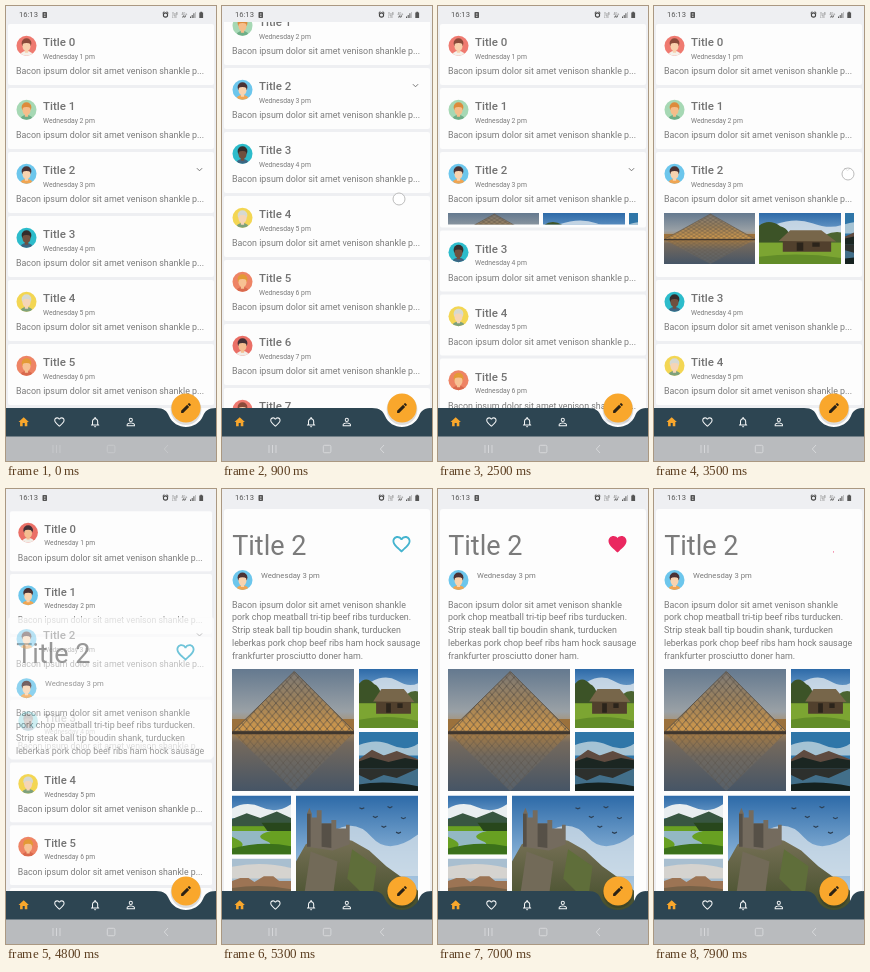
Recreate the animation shown at these times as an HTML page. Size 210 px wide and 455 px high, loop 8 s.

```html
<!DOCTYPE html>
<html lang="en">
<head>
<meta charset="utf-8">
<title>Card list</title>
<style>
html, body { margin: 0; width: 100%; height: 100%; overflow: hidden; background: #eeeff2; }
svg { display: block; }
#stage { width: 100vw; height: 100vh; }
text { font-family: Roboto, "Liberation Sans", sans-serif; fill: #7b7b7b; }
.title { font-size: 11.5px; font-weight: 500; fill: #737373; }
.date { font-size: 6.8px; }
.body { font-size: 8.9px; }
.big { font-size: 27px; }
</style>
</head>
<body>
<svg id="stage" viewBox="0 0 210 455" xmlns="http://www.w3.org/2000/svg">
  <defs>
    <linearGradient id="dusk" x2="0" y2="1">
      <stop offset="0" stop-color="#64798f"/><stop offset=".35" stop-color="#9aa1a6"/>
      <stop offset=".5" stop-color="#b08a58"/><stop offset=".6" stop-color="#75695c"/>
      <stop offset="1" stop-color="#465566"/>
    </linearGradient>
    <linearGradient id="glass" x2="0" y2="1">
      <stop offset="0" stop-color="#7d7a76"/><stop offset=".55" stop-color="#a08258"/>
      <stop offset="1" stop-color="#d39a4b"/>
    </linearGradient>
    <linearGradient id="mirror" x2="0" y2="1">
      <stop offset="0" stop-color="#a37a45"/><stop offset=".4" stop-color="#6f685f"/>
      <stop offset="1" stop-color="#56606a"/>
    </linearGradient>
    <linearGradient id="sky" x2="0" y2="1">
      <stop offset="0" stop-color="#2d6aa8"/><stop offset=".5" stop-color="#86b0d6"/>
      <stop offset="1" stop-color="#d3e0ea"/>
    </linearGradient>
    <linearGradient id="rock" x2="0" y2="1">
      <stop offset="0" stop-color="#797258"/><stop offset="1" stop-color="#3f4b27"/>
    </linearGradient>
    <pattern id="lattice" width="6" height="7" patternUnits="userSpaceOnUse">
      <path d="M0 0L6 7M6 0L0 7" stroke="#544c43" stroke-width=".6"/>
    </pattern>
    <symbol id="pyramid" viewBox="0 0 100 100" preserveAspectRatio="none">
      <rect width="100" height="100" fill="url(#dusk)"/>
      <path d="M0 41H18V38H30V42H72V38H84V41H100V52H0Z" fill="#9b713c"/>
      <path d="M1 53H99L51 100Z" fill="url(#mirror)"/>
      <path d="M1 53H99L51 100Z" fill="url(#lattice)" opacity=".6"/>
      <path d="M51 2L100 51H1Z" fill="url(#glass)"/>
      <path d="M51 2L100 51H1Z" fill="url(#lattice)" stroke="#5c544a" stroke-width=".8"/>
      <path d="M0 51H100V53.5H0Z" fill="#40372e"/>
    </symbol>
    <symbol id="cottage" viewBox="0 0 100 100" preserveAspectRatio="none">
      <rect width="100" height="100" fill="url(#sky)"/>
      <path d="M20 22Q45 8 65 20T100 24V48H10Z" fill="#dfe8ee" opacity=".8"/>
      <path d="M0 62V25Q12 10 26 26Q40 32 38 62Z" fill="#3c5327"/>
      <path d="M68 60Q82 34 100 38V65H68Z" fill="#4b6431"/>
      <rect y="58" width="100" height="42" fill="#7ca532"/>
      <path d="M0 86Q50 76 100 88V100H0Z" fill="#628c28"/>
      <path d="M29 50H88V76H29Z" fill="#51402d"/>
      <path d="M24 55L38 34H76L94 56Z" fill="#77664a"/>
      <path d="M46 58h8v16h-8zM65 58h9v8h-9z" fill="#2b241b"/>
    </symbol>
    <symbol id="lake" viewBox="0 0 100 100" preserveAspectRatio="none">
      <rect width="100" height="100" fill="#2f76a8"/>
      <path d="M0 22Q30 10 55 22T100 20V40H0Z" fill="#c4d6e0" opacity=".8"/>
      <path d="M0 46L22 30L42 40L64 32L100 46V60H0Z" fill="#5f4b40"/>
      <path d="M0 50L20 43L50 51L78 44L100 48V64H0Z" fill="#1b2622"/>
      <rect y="62" width="100" height="38" fill="#426f8a"/>
      <path d="M0 62H100L64 78L42 73L20 82L0 73Z" fill="#2d302d"/>
      <path d="M0 89Q45 81 100 92V100H0Z" fill="#15211f"/>
    </symbol>
    <symbol id="meadow" viewBox="0 0 100 100" preserveAspectRatio="none">
      <rect width="100" height="100" fill="url(#sky)"/>
      <path d="M0 22Q25 8 50 20T100 15V38H0Z" fill="#e9eef0"/>
      <path d="M0 40L25 30L48 38L76 27L100 38V60H0Z" fill="#385641"/>
      <rect y="52" width="100" height="48" fill="#68a022"/>
      <path d="M0 60H66Q34 68 58 77T22 98H0Q30 85 10 75T0 68Z" fill="#93b8c4"/>
      <path d="M50 46h50v14H60z" fill="#28471c"/>
      <path d="M0 90Q50 76 100 86V100H0Z" fill="#3b711a"/>
    </symbol>
    <symbol id="castle" viewBox="0 0 100 100" preserveAspectRatio="none">
      <rect width="100" height="100" fill="url(#sky)"/>
      <path d="M30 30Q48 18 62 34T100 32V66H20Z" fill="#d7e2ea" opacity=".75"/>
      <path d="M0 54L8 40L24 32L46 37L60 45L74 58L88 68L100 78V100H0Z" fill="url(#rock)"/>
      <path d="M12 46L34 54L28 100H4Z" fill="#726a58"/>
      <path d="M46 44L66 58L62 88L42 68Z" fill="#5f6e3a"/>
      <path d="M9 42V15L11 10L13 15V18H17V12H21V23H29V20H33V27H41V24H44V40L30 45Z" fill="#746b5e"/>
      <path d="M21 23H29V43L21 42ZM9 15H12V42H9Z" fill="#565047"/>
      <path d="M52 10l2 1 2-1M63 17l2 1 2-1M75 9l2 1 2-1M70 25l2 1 2-1M86 18l2 1 2-1M82 30l2 1 2-1" fill="none" stroke="#2d4054"/>
    </symbol>
    <symbol id="butte" viewBox="0 0 100 100" preserveAspectRatio="none">
      <rect width="100" height="100" fill="#a9bfd0"/>
      <path d="M0 14Q50 4 100 16V34H0Z" fill="#d5d3cf"/>
      <path d="M0 38L14 33H28L38 40L54 30H70L80 38H100V100H0Z" fill="#9c7454"/>
      <path d="M0 50Q50 42 100 52V100H0Z" fill="#766147"/>
    </symbol>
    <clipPath id="disc"><circle r="10"/></clipPath>
    <clipPath id="view"><rect y="16" width="210" height="415"/></clipPath>
    <clipPath id="strip"><rect id="stripBox" x="0" y="58" width="200"/></clipPath>
    <clipPath id="frame"><rect id="frameBox" x="2" width="206" rx="3"/></clipPath>
  </defs>

  <rect width="210" height="455" fill="#eeeff2"/>
  <g clip-path="url(#view)">
    <g id="list"></g>
    <g id="page">
      <g clip-path="url(#frame)">
        <rect x="2" y="16" width="206" height="415" fill="#fdfdfd"/>
        <g id="detail"></g>
      </g>
    </g>
    <g id="ghost"></g>
  </g>

  <text x="13" y="11.3" font-size="7.6" style="fill:#555">16:13</text>
  <g fill="#555">
    <rect x="36.5" y="6" width="4.5" height="6" rx=".7"/>
    <path d="M38.2 7.5h1.2v1.1h-1.2zM38.2 9.7h1.2v1h-1.2z" fill="#fff"/>
    <circle cx="159.5" cy="9" r="2.1" fill="none" stroke="#444" stroke-width="1.1"/>
    <path d="M156.6 7l1.7-1.4M162.4 7l-1.7-1.4" stroke="#444"/>
    <text x="166" y="8.7" font-size="3.2">VoB</text><text x="166" y="11.8" font-size="3.2">LTE</text>
    <text x="175.5" y="8.7" font-size="3.2">4G+</text><path d="M176 11.5l1.2-2h1.2l-1.2 2zM179 9.5h1.3l-1.2 2h-1.2z"/>
    <path d="M184 12h1v-1.5h-1zM185.7 12h1V9h-1zM187.4 12h1V7.3h-1z"/>
    <path d="M189 12h.8V6H189z" opacity=".4"/>
    <path d="M193.3 6.6h1v-.9h1.8v.9h1V12h-3.8z"/>
  </g>

  <path d="M0 402H150C158 402 161 405 163 410C166 417 173 421 180 421S194 417 197 410C199 405 202 402 210 402V431H0Z" fill="#2d4552"/>
  <rect y="430.5" width="210" height="24.5" fill="#b9bbbe"/>
  <g id="keys" fill="none" stroke="#dadbdd" stroke-width=".9">
    <path d="M47 439v8M50.5 439v8M54 439v8M162 439l-3.7 4 3.7 4"/>
    <rect x="101.3" y="439.3" width="7.6" height="7.4" rx="1.3"/>
  </g>
  <g id="tabs"></g>
  <circle cx="180" cy="403.5" r="15.4" fill="#000" opacity=".13"/>
  <circle cx="180" cy="402" r="14.6" fill="#f9a72c"/>
  <g id="pen"></g>
  <circle id="touch" r="6" fill="#fff" fill-opacity=".8" stroke="#b5b5b5" stroke-width=".9"/>
</svg>
<script>
const LOOP = 8000, STEP = 100, TOP = 18, PITCH = 64, OPEN = 64;
const $ = id => document.getElementById(id);
const set = (el, props) => { for (const k in props) el.setAttribute(k, props[k]); };
const clamp = x => Math.min(1, Math.max(0, x));
const span = (t, a, b) => clamp((t - a) / (b - a));
const ease = u => u < .5 ? 4 * u ** 3 : 1 - (2 - 2 * u) ** 3 / 2;
const mix = (a, b, u) => a + (b - a) * u;

const GLYPHS = {
  home: 'M10 20v-6h4v6h5v-8h3L12 3 2 12h3v8z',
  full: 'M12 21.35l-1.45-1.32C5.4 15.36 2 12.28 2 8.5 2 5.42 4.42 3 7.5 3c1.74 0 3.41.81 4.5 2.09C13.09 3.81 14.76 3 16.5 3 19.58 3 22 5.42 22 8.5c0 3.78-3.4 6.86-8.55 11.54z',
  bell: 'M12 22c1.1 0 2-.9 2-2h-4c0 1.1.9 2 2 2zm6-6v-5c0-3.07-1.63-5.64-4.5-6.32V4a1.5 1.5 0 0 0-3 0v.68C7.64 5.36 6 7.92 6 11v5l-2 2v1h16v-1zm-2 1H8v-6c0-2.48 1.51-4.5 4-4.5s4 2.02 4 4.5z',
  person: 'M12 5.9a2.1 2.1 0 1 1 0 4.2 2.1 2.1 0 0 1 0-4.2m0 9c2.97 0 6.1 1.46 6.1 2.1v1.1H5.9V17c0-.64 3.13-2.1 6.1-2.1M12 4a4 4 0 1 0 0 8 4 4 0 0 0 0-8zm0 9c-2.67 0-8 1.34-8 4v3h16v-3c0-2.66-5.33-4-8-4z',
  pen: 'M3 17.25V21h3.75L17.81 9.94l-3.75-3.75zM20.71 7.04a1 1 0 0 0 0-1.41l-2.34-2.34a1 1 0 0 0-1.41 0l-1.83 1.83 3.75 3.75z'
};
GLYPHS.heart = GLYPHS.full + 'M12.1 18.55C7.14 14.24 4 11.39 4 8.5 4 6.5 5.5 5 7.5 5c1.54 0 3.04.99 3.57 2.36h1.87C13.46 5.99 14.96 5 16.5 5c2 0 3.5 1.5 3.5 3.5 0 2.89-3.14 5.74-7.9 10.05z';

const glyph = (name, x, y, size, fill) =>
  `<path d="${GLYPHS[name]}" fill="${fill}" fill-rule="evenodd" transform="translate(${x - size / 2} ${y - size / 2}) scale(${size / 24})"/>`;
const label = (x, y, cls, s) => `<text x="${x}" y="${y}" class="${cls}">${s}</text>`;
const photo = (id, x, y, w, h) => `<use href="#${id}" x="${x}" y="${y}" width="${w}" height="${h}"/>`;

// background, skin, hair, shirt
const FACES = [
  ['#ef7a70', '#f8d0ac', '#8b4a3a', '#f4f1ea'],
  ['#a6d8b4', '#f6bd8a', '#dd8b3c', '#6eae87'],
  ['#6cc6ec', '#f9d3ae', '#4a3234', '#f0a552'],
  ['#2dbccb', '#70503f', '#342d2c', '#3c6683'],
  ['#f3d653', '#f5d5b6', '#d6d9d2', '#7ea17b'],
  ['#ee8465', '#f7c193', '#e39a36', '#d9694d'],
  ['#ea6f66', '#f4bd90', '#433036', '#f0ede7']
];
const avatar = (kind, x, y) => {
  const [bg, skin, hair, shirt] = FACES[kind % FACES.length];
  return `<g transform="translate(${x} ${y})"><circle r="10" fill="${bg}"/><g clip-path="url(#disc)">
    <ellipse cy="10" rx="6.5" ry="4.6" fill="${shirt}"/><circle cy="-2.6" r="4.9" fill="${hair}"/>
    <path d="M-1.6 3h3.2v4h-3.2z" fill="${skin}"/><ellipse cy=".6" rx="4" ry="5" fill="${skin}"/>
    <path d="M-4.5 -1.6Q-3 -7 4.5 -3.6V-1.6Q0 -4 -4.5 -1.6Z" fill="${hair}"/></g></g>`;
};

const BLURB = 'Bacon ipsum dolor sit amet venison shankle';
const row = (i, kind = i) => avatar(kind, 20.5, 21.7) +
  label(37, 22.3, 'title', 'Title ' + i) +
  label(37, 34.8, 'date', `Wednesday ${i + 1} pm`) +
  label(10, 50.3, 'body', BLURB + ' p...');
const CHEVRON = '<path class="chevron" d="M-2.6 -1.3L0 1.3L2.6 -1.3" fill="none" stroke="#777" stroke-width="1"/>';

$('list').innerHTML = '<rect x="-20" y="-200" width="250" height="900" fill="#eeeff2"/>' +
  Array.from({ length: 10 }, (_, i) => `<g class="card">
    <rect class="paper" x="2" width="206" height="61" rx="2" fill="#fdfdfd"/>
    ${i === 2 ? '<g clip-path="url(#strip)">' + photo('pyramid', 10, 61, 91, 51) + photo('cottage', 105, 61, 82, 51) +
      photo('lake', 191, 61, 82, 51) + '</g>' : ''}
    <g class="row">${row(i)}${i === 2 ? CHEVRON : ''}</g></g>`).join('');
$('ghost').innerHTML = row(2) + CHEVRON;
document.querySelectorAll('.chevron').forEach(c => set(c, { transform: 'translate(193.5 17.5)' }));

$('detail').innerHTML = label(10.2, 65.5, 'big', 'Title 2') + avatar(2, 20.5, 91) +
  '<text x="39" y="89" font-size="7.7">Wednesday 3 pm</text>' +
  [BLURB, 'pork chop meatball tri-tip beef ribs turducken.', 'Strip steak ball tip boudin shank, turducken',
   'leberkas pork chop beef ribs ham hock sausage', 'frankfurter prosciutto doner ham.']
    .map((s, i) => label(10, 118.5 + i * 12.8, 'body', s)).join('') +
  photo('pyramid', 10, 180, 122, 122) + photo('cottage', 137, 180, 59, 59) + photo('lake', 137, 243, 59, 59) +
  photo('meadow', 10, 306.5, 59, 59) + photo('castle', 74, 306.5, 122, 122) + photo('butte', 10, 369.5, 59, 59) +
  '<path id="like" fill-rule="evenodd"/>';

$('tabs').innerHTML = ['home', 'heart', 'bell', 'person'].map((n, i) =>
  glyph(n, 17.7 + i * 35.7, 416, 12.4, i ? '#f4f6f7' : '#f9a72c')).join('');
$('pen').innerHTML = glyph('pen', 180, 402, 13, '#2b2215');

const cards = [...document.querySelectorAll('.card')];
const papers = cards.map(c => c.querySelector('.paper'));
const rows = cards.map(c => c.querySelector('.row'));

// Some avatars differ once the list is rebuilt.
let rebuilt = null;
function rebuild(on) {
  if (on === rebuilt) return;
  rebuilt = on;
  rows[0].innerHTML = row(0, on ? 6 : 0);
  rows[1].innerHTML = row(1, on ? 2 : 1);
}

function touchAt(t, scroll) {
  if (t >= 500 && t < 1700) return [177, 277 - scroll];
  if (t >= 2200 && t < 2400 || t >= 3500 && t < 3700) return [194, 168];
  if (t >= 5900 && t < 6100 || t >= 7300 && t < 7500) return [180, 57];
  return null;
}

function heartState(t) {
  if (t < 6400) return ['heart', '#45b4cf', 1 - ease(span(t, 5800, 6400))];
  if (t < 7300) return ['full', '#ea2860', ease(span(t, 6350, 6900)) + .12 * Math.sin(Math.PI * span(t, 6600, 7000))];
  return ['full', '#ea2860', 1 - ease(span(t, 7200, 7900))];
}

function draw(t) {
  const scroll = 56 * (1 - Math.cos(2 * Math.PI * span(t, 500, 1700)));
  const open = ease(span(t, 2250, 2900)) - ease(span(t, 3550, 4300));
  const u = span(t, 4560, 5280), p = ease(u), moving = u > 0;

  rebuild(moving);
  cards.forEach((c, i) => set(c, { transform: `translate(0 ${TOP + i * PITCH - scroll + (i > 2 ? OPEN * open : 0)})` }));
  set(papers[2], { height: 61 + OPEN * open });
  set($('stripBox'), { height: Math.max(0, OPEN * open) });
  rows[2].style.display = moving ? 'none' : '';
  const k = 1 - .057 * u;
  set($('list'), {
    transform: `translate(${105 * (1 - k)} ${246 * (1 - k)}) scale(${k})`,
    opacity: u < 1 ? 1 : 0
  });

  const top = mix(146, 19, p);
  $('page').style.display = moving ? '' : 'none';
  set($('page'), { opacity: Math.min(1, u * 2.3) });
  set($('frameBox'), { y: top + 1, height: mix(206, 625, p) - top });
  set($('detail'), { transform: `translate(0 ${top - 19})` });
  set($('ghost'), { transform: `translate(0 ${top + 1})`, opacity: moving ? clamp(1 - u * 1.6) : 0 });

  const [shape, fill, s] = heartState(t);
  const z = .9 * Math.max(.06, s);
  set($('like'), { d: GLYPHS[shape], fill, transform: `translate(179.5 63.6) scale(${z}) translate(-12 -21.35)` });

  const spot = touchAt(t, scroll);
  $('touch').style.display = spot ? '' : 'none';
  if (spot) set($('touch'), { cx: spot[0], cy: spot[1] });
  set($('keys'), { opacity: t < 500 ? .45 : 1 });
}

const start = performance.now();
function tick(now) {
  const t = Math.max(0, now - start) % LOOP;
  draw(Math.floor(t / STEP) * STEP);
  requestAnimationFrame(tick);
}
draw(0);
requestAnimationFrame(tick);
</script>
</body>
</html>
```
